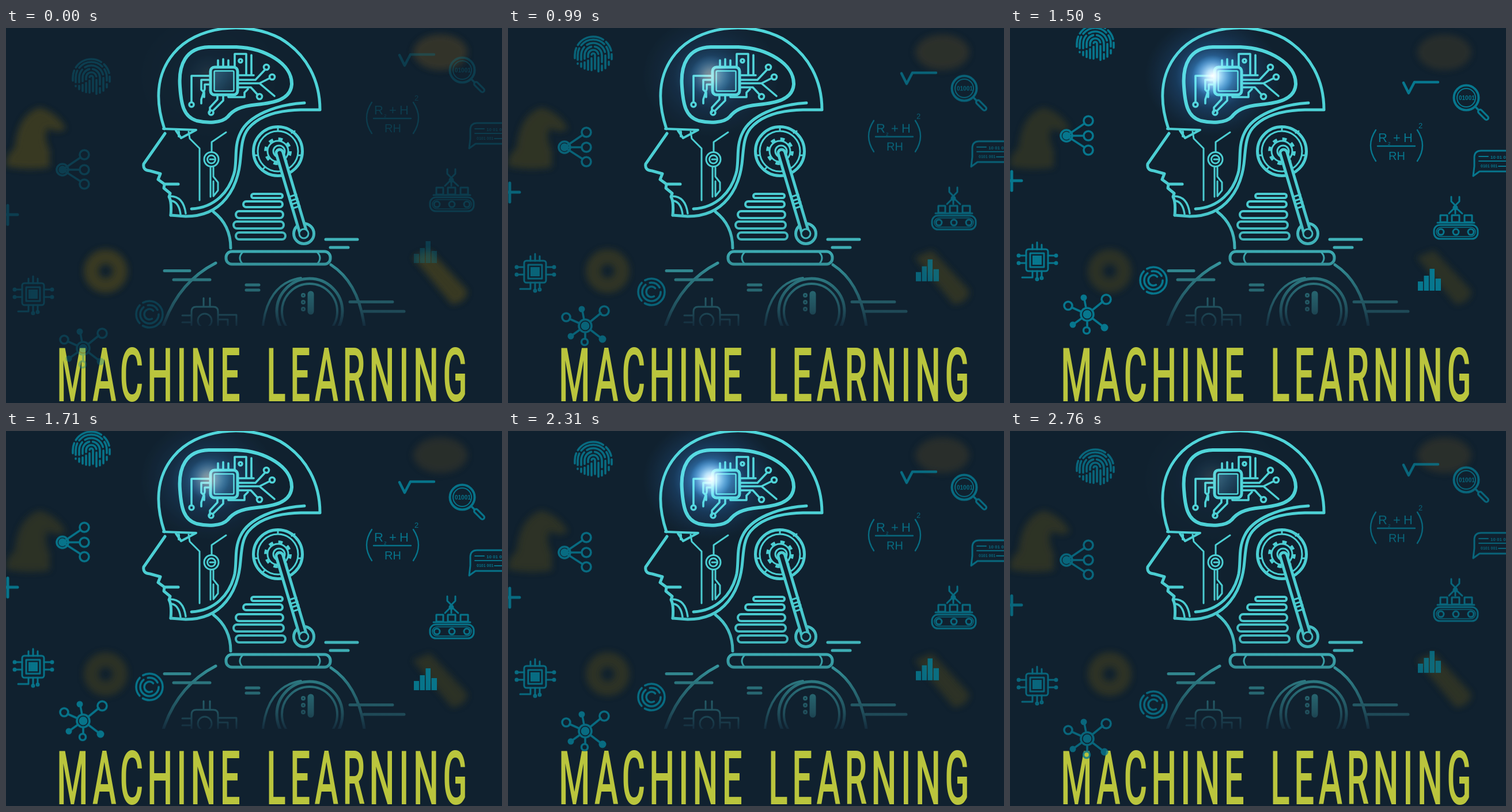
Animation, 861 px wide and 651 px high, one loop 2.79 s. Source, as an HTML page:

```html
<!DOCTYPE html>
<html lang="en">
<head>
<meta charset="utf-8">
<title>Machine Learning</title>
<style>
  html, body { margin: 0; width: 100%; height: 100%; overflow: hidden; background: #10212f; }
  svg { display: block; width: 861px; height: 651px; }
  .line { fill: none; stroke-linecap: round; stroke-linejoin: round; }
  .title { font: 500 130px Roboto, Arial, sans-serif; fill: #bac53d; }
  .icons { stroke: #08788f; stroke-width: 3.6; animation: 2790ms linear infinite; }
  .icons .solid { fill: #08788f; stroke: none; }
  .icons text { fill: #08788f; stroke: none; font-family: "Liberation Sans", Arial, sans-serif; }
  .rise { animation-name: rise; }
  .sink { animation-name: sink; }
  .glow { mix-blend-mode: screen; animation: glow 2790ms linear infinite; }
  .haze { animation: haze 2790ms linear infinite; }
  @keyframes rise {
    0% { transform: translateY(59px); opacity: .34; }
    53.763% { transform: none; opacity: 1; }
    100% { transform: translateY(37.9px); opacity: .8; }
  }
  @keyframes sink {
    0% { transform: translateY(-48px); opacity: .32; }
    53.763% { transform: none; opacity: 1; }
    100% { transform: translateY(-37px); opacity: .8; }
  }
  @keyframes glow {
    0% { opacity: .08; }
    35.5% { opacity: .52; }
    53.763% { opacity: 1; }
    69.9% { opacity: .06; }
    82.8% { opacity: 1; }
    100% { opacity: .06; }
  }
  @keyframes haze {
    0% { opacity: .95; }
    53.763% { opacity: .66; }
    100% { opacity: .7; }
  }
</style>
</head>
<body>
<svg viewBox="0 0 861 651">
  <defs>
    <linearGradient id="ink" gradientUnits="userSpaceOnUse" x1="0" y1="0" x2="0" y2="520">
      <stop offset="0" stop-color="#50d6da"/>
      <stop offset=".6" stop-color="#4acbd0"/>
      <stop offset=".75" stop-color="#3ca9b0"/>
      <stop offset=".84" stop-color="#2b747d"/>
      <stop offset=".94" stop-color="#204d5a"/>
      <stop offset="1" stop-color="#13293a"/>
    </linearGradient>
    <radialGradient id="halo">
      <stop offset="0" stop-color="#56a8f5"/>
      <stop offset=".25" stop-color="#2f7ccc" stop-opacity=".75"/>
      <stop offset=".55" stop-color="#174a8c" stop-opacity=".36"/>
      <stop offset="1" stop-color="#10305c" stop-opacity="0"/>
    </radialGradient>
    <radialGradient id="core">
      <stop offset="0" stop-color="#fff"/>
      <stop offset=".3" stop-color="#c5eaff" stop-opacity=".9"/>
      <stop offset="1" stop-color="#3f98e8" stop-opacity="0"/>
    </radialGradient>
    <linearGradient id="die" x1="0" y1="0" x2="1" y2="1">
      <stop offset="0" stop-color="#24506a"/>
      <stop offset="1" stop-color="#13293a"/>
    </linearGradient>
    <filter id="blur" x="-50%" y="-50%" width="200%" height="200%"><feGaussianBlur stdDeviation="6"/></filter>
    <clipPath id="bust"><path d="M0 0H861V517H0Z"/></clipPath>
  </defs>

  <g class="haze" filter="url(#blur)" fill="#3b3b23">
    <ellipse cx="754" cy="42" rx="47" ry="31" fill="#34362a"/>
    <path d="M0 240Q-2 222 15 208Q20 150 58 138Q88 146 104 174Q94 184 72 174Q64 190 76 212V242Q36 248 0 240Z"/>
    <circle cx="173" cy="422" r="25" fill="none" stroke="#3b3b23" stroke-width="26"/>
    <path d="M706 398L736 386L801 456Q800 476 774 480Z"/>
  </g>

  <g class="title">
    <text transform="translate(88 648) scale(.48 1)" letter-spacing="14">MACHINE</text>
    <text transform="translate(452 648) scale(.48 1)" letter-spacing="15">LEARNING</text>
  </g>

  <g class="icons line rise">
    <g id="print"></g>
    <path d="M98 187H127M98 187L129 166M98 187L129 207"/>
    <circle cx="98" cy="187" r="10"/><circle class="solid" cx="98" cy="187" r="7"/>
    <circle cx="136" cy="161" r="8"/><circle cx="136" cy="187" r="8"/><circle cx="136" cy="212" r="8"/>
    <path d="M-6 265H20M3 249V282" stroke-width="5"/>
    <g stroke-width="3">
      <rect x="28" y="384" width="38" height="38" rx="4"/>
      <rect x="35" y="391" width="24" height="24"/>
      <rect class="solid" x="39" y="395" width="16" height="16"/>
      <path d="M39 384V376M47 384V372M55 384V376M28 395H15M28 408H15M66 395H80M66 408H80M39 422V433H21M47 422V434M55 422V432"/>
      <circle cx="15" cy="395" r="2"/><circle cx="15" cy="408" r="2"/><circle cx="80" cy="395" r="2"/>
      <circle cx="80" cy="408" r="2"/><circle cx="47" cy="436" r="2"/><circle cx="55" cy="434" r="2"/>
    </g>
    <circle cx="249" cy="438" r="23" stroke-dasharray="48 7 34 7"/>
    <circle cx="249" cy="438" r="16" stroke-dasharray="64 8 20 8"/>
    <circle cx="249" cy="438" r="9" stroke-dasharray="40 17" transform="rotate(60 249 438)"/>
    <path d="M134 497L107 485M134 497L129 470M134 497L161 475M134 497L164 520M134 497V519M134 497L109 515"/>
    <circle cx="134" cy="497" r="11" fill="#10212f"/><circle class="solid" cx="134" cy="497" r="7.5"/>
    <circle cx="101" cy="482" r="7"/><circle cx="167" cy="471" r="8"/><circle cx="133" cy="525" r="5.5"/>
    <circle class="solid" cx="128" cy="468" r="5.5"/><circle class="solid" cx="164" cy="520" r="6.5"/>
    <circle class="solid" cx="109" cy="515" r="5.5"/>
  </g>

  <g class="icons line sink">
    <path d="M683 95L692 113L702 94H743" stroke-width="4.5"/>
    <circle cx="792" cy="121" r="21.5" stroke-width="4"/><circle cx="792" cy="121" r="16" stroke-width="2"/>
    <text x="779" y="125" font-size="10" font-weight="700">01001</text>
    <path d="M808 137L814 143"/>
    <path d="M816 145L827 156" stroke-width="10"/><path d="M816 145L827 156" stroke="#10212f" stroke-width="3.5"/>
    <g stroke-width="2.4">
      <path d="M635 177Q617 204 635 231M707 177Q725 204 707 231M638 205H703"/>
      <text x="639" y="198" font-size="22">R</text>
      <text x="656" y="203" font-size="8">2</text>
      <text x="665" y="198" font-size="22">+</text>
      <text x="683" y="198" font-size="22">H</text>
      <text x="657" y="229" font-size="20">RH</text>
      <text x="709" y="174" font-size="13">2</text>
    </g>
    <g stroke-width="3">
      <path d="M870 213H818Q806 213 806 225V240L804 257L815 249H870"/>
      <path d="M814 223H830M814 231H870M848 240H861" stroke-width="2"/>
      <text x="834" y="227" font-size="8" font-weight="700">10 01 0</text>
      <text x="817" y="242" font-size="7" font-weight="700">0101 001</text>
    </g>
    <g stroke-width="3">
      <rect x="736" y="342" width="76" height="24" rx="10"/>
      <rect x="740" y="346" width="68" height="16" rx="8" stroke-width="1.5"/>
      <circle cx="748" cy="354" r="5"/><circle cx="774" cy="354" r="5"/><circle cx="800" cy="354" r="5"/>
      <path d="M742 338H806M747 325H759V337H747ZM767 325H780V337H767ZM789 325H802V337H789Z"/>
      <path d="M773 311L762 322M773 311L785 322M773 311V322M766 293V301L773 308L780 301V293"/>
      <circle cx="773" cy="312" r="3"/>
    </g>
    <path class="solid" d="M708 440H717V456H708ZM718.5 430H727V456H718.5ZM728.5 418H737V456H728.5ZM738.5 435H748V456H738.5Z"/>
  </g>

  <g class="line" stroke="url(#ink)" stroke-width="5" clip-path="url(#bust)">
    <!-- skull, jaw and profile -->
    <path d="M275 175C260 130 259 82 291 44C330 -3 415 -14 476 18C523 46 545 92 545 142H512C470 143 438 154 421 174C408 190 409 212 406 236C401 275 378 327 312 327L286 325"/>
    <path d="M518 130C468 133 421 152 407 182C396 204 401 226 397 248C389 284 362 312 322 314"/>
    <path d="M276 183L239 236Q237 247 250 248L268 253L264 263L275 271H299M275 271L274 278L285 287L283 293Q288 302 286 325"/>
    <path d="M285 292Q308 292 312 322M287 300Q300 302 303 323" stroke-width="3.5"/>
    <path d="M273 175L330 177L304 191L295 178M300 180V188" stroke-width="4"/>
    <g stroke-width="3">
      <path d="M317 180L319 192L336 209V299M382 181L357 198V215M355 242V293M360 242V258L368 268V282L360 292V266"/>
      <circle cx="356.5" cy="228" r="12.5"/><circle cx="356.5" cy="228" r="7"/><path d="M354 228H361"/>
    </g>

    <!-- brain and circuit -->
    <path d="M302 102C299 64 312 34 352 33H400C450 35 497 62 496 98C494 125 464 130 435 133C405 136 394 143 385 154C374 166 348 165 331 161C308 154 304 132 302 102Z" stroke-width="6"/>
    <g stroke-width="3.6">
      <path d="M368 68V56M377 68V54M386 68V56M355 83H322V129M355 90H339V107L344 112V120M352 98H345V106L339 124V131"/>
      <path d="M386 115V120H414V112L420 106M377 115V126L360 143M367 115V124L354 138V146"/>
      <path d="M402 90H433L450 72M402 96H440L466 118M440 96L458 87M402 103H425L437 116"/>
      <path d="M397 70V45H417V82M426 47V82M401 82H430"/>
      <circle cx="322" cy="133" r="4"/><circle cx="356" cy="147" r="4"/><circle cx="452" cy="68" r="4.5"/>
      <circle cx="462" cy="85" r="4.5"/><circle cx="440" cy="119" r="4.5"/><circle cx="407" cy="57" r="3"/>
    </g>
    <rect x="355" y="68" width="47" height="48" rx="7" fill="#10212f"/>
    <rect x="361.5" y="74.5" width="34" height="35" rx="2" stroke-width="2.5" fill="url(#die)"/>

    <!-- ear joint and piston -->
    <circle cx="472" cy="214" r="42.5"/>
    <circle cx="472" cy="214" r="35" stroke-width="3"/>
    <path d="M472 171V177M430 221H437M507 221H514M444 247L449 242M496 182L501 179" stroke-width="3"/>
    <circle cx="472" cy="214" r="18" stroke-width="3"/>
    <circle cx="472" cy="214" r="21.5" stroke-width="5" stroke-dasharray="7.5 9.4" stroke-linecap="butt"/>
    <circle cx="474" cy="214" r="10" stroke-width="3"/>
    <circle cx="517" cy="357" r="17.5"/>
    <path d="M475 217L516 355" stroke-width="17"/>
    <path d="M475 217L516 355" stroke-width="7" stroke="#10212f"/>
    <path d="M492 293L504 289M494 300L506 296M496 306L508 302M498 313L510 309" stroke-width="3"/>
    <circle cx="517" cy="357" r="8" stroke-width="3" fill="#10212f"/>

    <!-- neck and collar -->
    <g stroke-width="4">
      <rect x="426" y="288" width="54" height="7" rx="3.5"/>
      <rect x="412" y="301" width="68" height="10" rx="5"/>
      <rect x="399" y="318" width="82" height="12" rx="6"/>
      <rect x="395" y="336" width="87" height="12" rx="6"/>
      <rect x="399" y="355" width="86" height="12" rx="6"/>
    </g>
    <path d="M360 319Q390 342 390 382"/>
    <rect x="382" y="388" width="181" height="22" rx="10"/>
    <path d="M411 389Q401 399 411 410M540 389Q550 399 540 410" stroke-width="3"/>

    <!-- shoulders, chest and dashes -->
    <path d="M364 408Q298 442 273 518M564 411Q612 442 622 518"/>
    <path d="M555 367H610M563 381H594M275 421.5H319M291 437H354M417 446H439M417 455H439M597 475.5H671M621 492H691"/>
    <path d="M446 518C450 475 470 440 512 434" stroke-width="4"/>
    <circle cx="527" cy="492" r="57"/>
    <circle cx="527" cy="492" r="48" stroke-width="4"/>
    <g stroke-width="3">
      <circle cx="516" cy="464" r="2.5"/><circle cx="516" cy="476" r="2.5"/><circle cx="516" cy="488" r="2.5"/>
      <path d="M529 462V492" stroke-width="11"/>
      <path d="M322 518V492Q322 484 330 484H360Q368 484 368 492V518M343 484V469M354 484V469M322 499H306M322 511H306M368 498H400V518M368 506H385V518"/>
      <circle cx="345" cy="508" r="12"/>
    </g>
  </g>

  <g class="glow">
    <ellipse cx="352" cy="84" rx="118" ry="104" fill="url(#halo)"/>
    <circle cx="352" cy="83" r="36" fill="url(#core)"/>
  </g>
</svg>
<script>
  // Fingerprint: nested arches whose legs end on a common circle.
  const ridges = [3, 9, 15, 21, 27, 32];
  document.getElementById('print').innerHTML = ridges.map((r, i) => {
    const leg = Math.sqrt(33 * 33 - r * r);
    return `<path d="M${148 - r} ${27 + leg * .8}V27A${r} ${r} 0 0 1 ${148 + r} 27V${27 + leg * .9}"
      stroke-dasharray="${18 + r} 6 ${34 - r / 2} 6" stroke-dashoffset="${i * 11}"/>`;
  }).join('');
</script>
</body>
</html>
```
